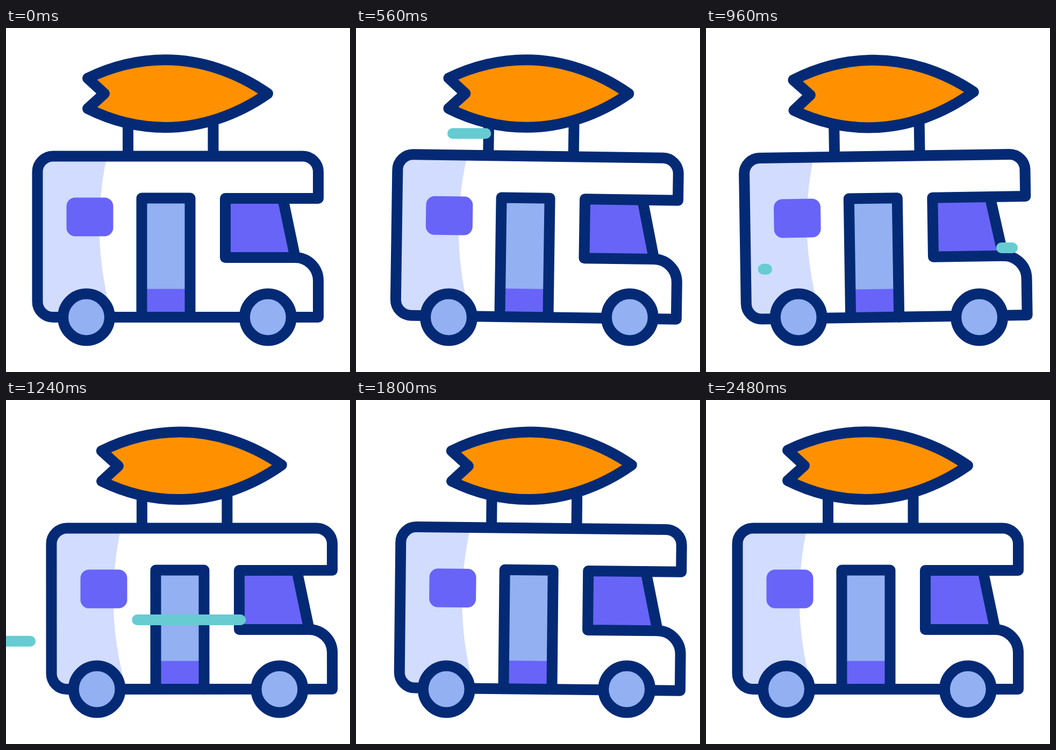
Recreate the animation shown at these times as an HTML page with a canvas. Size 640 by 640 pixels, loop 2800 ms.

```html
<!DOCTYPE html>
<html lang="en">
<head>
<meta charset="utf-8">
<title>Camper van</title>
<style>
  html, body { margin: 0; width: 100%; height: 100%; overflow: hidden; background: #fff; }
  canvas { display: block; width: 100vmin; height: 100vmin; }
</style>
</head>
<body>
<canvas id="stage" width="640" height="640"></canvas>
<script>
const ctx = document.getElementById('stage').getContext('2d');
const LOOP = 2800, STEP = 40, RAD = Math.PI / 180;
const DEPART = 440, RETURN = 2080, ARRIVE = 2480;
const NAVY = '#042a75', ORANGE = '#ff9100', PALE = '#d2dcfe',
      VIOLET = '#6864f7', SKY = '#92b0f2', TEAL = '#66ccd2';

const clamp = v => Math.min(1, Math.max(0, v));
const smooth = v => { v = clamp(v); return v * v * (3 - 2 * v); };
const easeOut = v => 1 - (1 - clamp(v)) ** 2;
const backIn = (v, pull) => v * v * ((pull + 1) * v - pull);
const sin = degrees => Math.sin(degrees * RAD);

const winds = [
  { y: 196.3, from: 640, to: 180, start: 50 },
  { y: 409, from: 570, to: 190, start: 897 },
  { y: 448.7, from: 113, to: -117, start: 915 }
];

// 0 when parked, 1 when driving, negative while pulling back to start.
const drive = t => t < RETURN
  ? backIn(smooth(t / DEPART), 5.5)
  : 1 - easeOut((t - RETURN) / (ARRIVE - RETURN));

// Rocking phase in degrees; the rhythm quickens slightly on the way.
function rocking(t) {
  const u = t - 275;
  return 1.458 * u + 3.37e-5 * u * u;
}

const wheelShift = (t, lead) =>
  drive(t) * (18.5 + 4.5 * sin((t - 560) / 385 * 360 + 98 + lead));

function shape(path, fill, stroke) {
  const p = new Path2D(path);
  if (fill) { ctx.fillStyle = fill; ctx.fill(p); }
  if (stroke) { ctx.strokeStyle = stroke; ctx.stroke(p); }
}

function turned(x, y, shift, degrees, draw) {
  ctx.save();
  ctx.translate(x + shift, y);
  ctx.rotate(degrees * RAD);
  ctx.translate(-x, -y);
  draw();
  ctx.restore();
}

function drawBody() {
  shape('M227 180V238M385.5 180V238', null, NAVY);
  shape('M188 238Q157 379 193 520L196 538H87.5A29 29 0 0 1 58.5 509V267.5A29 29 0 0 1 87.5 238.5Z', PALE);
  ctx.fillStyle = VIOLET;
  ctx.beginPath();
  ctx.roundRect(112.5, 315.5, 87, 72, 16);
  ctx.fill();
  shape('M408 317H515L538 427H408Z', VIOLET);
  shape('M252.5 316.5H342.5V538H252.5Z', SKY);
  shape('M252.5 485.5H342.5V538H252.5Z', VIOLET);
  shape('M252.5 538V316.5H342.5V538', null, NAVY);
  shape('M515 317L538 427', null, NAVY);
  shape('M87.5 238.5H552A29 29 0 0 1 581 267.5V317H408V427H538A43 43 0 0 1 581 470V538H87.5A29 29 0 0 1 58.5 509V267.5A29 29 0 0 1 87.5 238.5Z', null, NAVY);
}

function drawBoard() {
  shape('M152 93.5C200 70 248 59.3 297 59.3C363 59.3 430 82 487 122C430 162 363 184.9 297 184.9C248 184.9 200 174 152 150L183 122Z', ORANGE, NAVY);
}

function drawWheel(x) {
  ctx.beginPath();
  ctx.arc(x, 538, 43.4, 0, 2 * Math.PI);
  ctx.fillStyle = SKY;
  ctx.fill();
  ctx.strokeStyle = NAVY;
  ctx.stroke();
}

function drawWind({ y, from, to, start }, t) {
  const lead = smooth((t - start) / 450);
  const tail = smooth((t - start - 163) / 450);
  if (lead <= 0 || tail >= 1) return;
  const at = p => from + (to - from) * p;
  shape(`M${at(lead)} ${y}H${at(tail)}`, null, TEAL);
}

function render(t) {
  ctx.fillStyle = '#fff';
  ctx.fillRect(0, 0, 640, 640);
  ctx.lineWidth = 20;
  ctx.lineCap = ctx.lineJoin = 'round';

  const strength = Math.max(0, drive(t)) ** 2;
  const phase = rocking(t);
  const angle = 0.96 * strength * sin(phase);
  const shift = 26 * drive(t) - 17 * strength * sin(phase) ** 4;
  const tilt = strength * (0.7 * sin(phase + 20) - 0.6);

  turned(320, 386, shift, angle, drawBody);
  turned(320, 122, shift + 230 * angle * RAD, tilt, drawBoard);
  drawWheel(149.5 + wheelShift(t, 0));
  drawWheel(487.3 + wheelShift(t, 30));
  for (const wind of winds) drawWind(wind, t);
}

function tick() {
  const t = performance.now() % LOOP;
  render(Math.floor(t / STEP) * STEP);
  requestAnimationFrame(tick);
}
tick();
</script>
</body>
</html>
```
